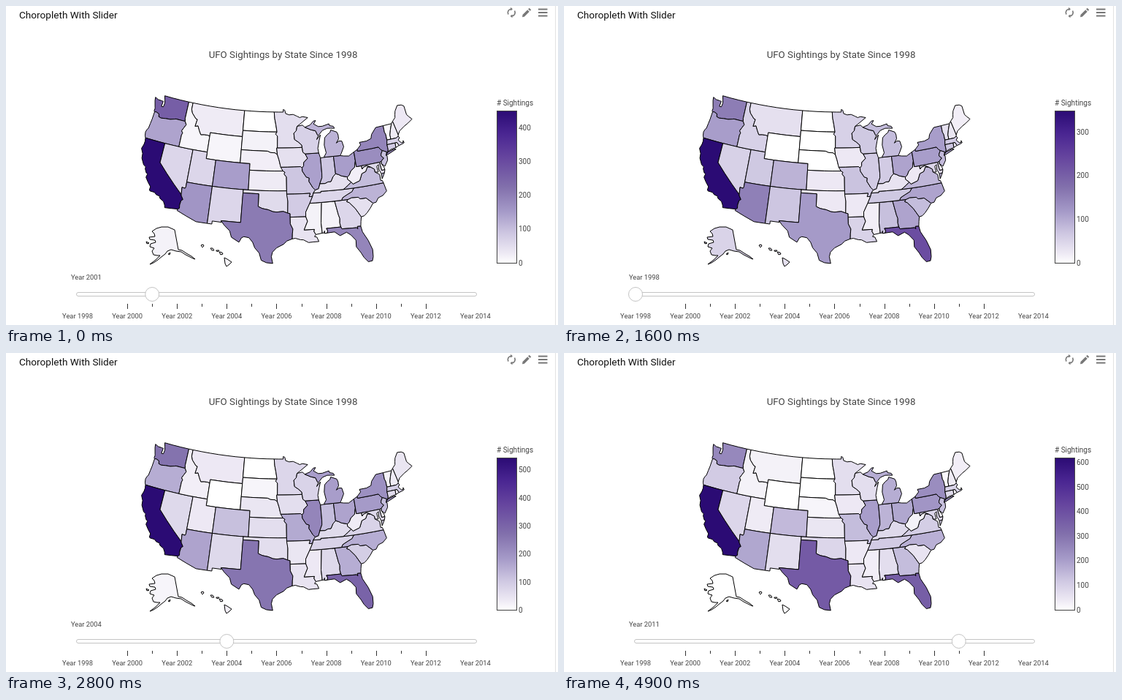
Write an HTML page that moves like this. It is 756 by 436 pixels and loops after 5000 ms.

```html
<!DOCTYPE html>
<html lang="en">
<head>
<meta charset="utf-8">
<title>Choropleth With Slider</title>
<style>
html, body { margin: 0; width: 100%; height: 100%; overflow: hidden; background: #fff; }
svg { display: block; width: 756px; height: 436px; font-family: Roboto, sans-serif; fill: #444; }
#map path { stroke: #000; stroke-width: 1; stroke-linejoin: round; }
.small { font-size: 9.35px; }
.legend { font-size: 10px; }
.icon { fill: none; stroke: #777; stroke-width: 1.6; }
.rail { fill: #fff; stroke: #c4c4c4; }
</style>
</head>
<body>
<svg viewBox="0 0 756 436">
  <defs><linearGradient id="ramp" x1="0" y1="1" x2="0" y2="0"></linearGradient></defs>
  <path d="M752.5 0V436" stroke="#e2e2e2"/>
  <text x="18" y="16.5" font-size="13.6" fill="#111">Choropleth With Slider</text>
  <g class="icon">
    <path d="M688 11.5A4.8 4.8 0 0 1 692 4.2M696.500 6.500A4.800 4.800 0 0 1 692.500 13.800"/>
    <path d="M691 1.800L694 4.200 691 6.600zM693.500 11.400L690.500 13.800 693.500 16.200z" fill="#777" stroke="none"/>
    <path d="M708.5 13.500L715.500 6.500" stroke-width="3.600"/>
    <path d="M716.400 5.600L718 4" stroke-width="3.600"/>
    <path d="M707 15.200l.6-3 2.400 2.400z" fill="#777" stroke="none"/>
    <path d="M729 4.500h12.500M729 9h12.500M729 13.500h12.500" stroke-width="1.800"/>
  </g>
  <text x="379.5" y="71" font-size="13.3" text-anchor="middle">UFO Sightings by State Since 1998</text>
  <g id="map"></g>
  <text class="legend" x="672" y="135.500">#&#160;Sightings</text>
  <rect x="672.500" y="143.500" width="27" height="208" fill="url(#ramp)" stroke="#444"/>
  <g id="scale" class="legend"></g>
  <text id="label" class="small" x="89" y="374"></text>
  <rect class="rail" x="96.500" y="391.500" width="548" height="5" rx="2.500"/>
  <g id="ticks" class="small" text-anchor="middle"></g>
  <circle id="knob" class="rail" cy="394" r="9.500"/>
</svg>
<script>
const LOOP = 5000;
const SCHEDULE = [[0, 2001], [500, 2000], [800, 1999], [1100, 1998], [1900, 1999], [2300, 2000], [2500, 2002],
  [2800, 2004], [3100, 2005], [3500, 2006], [3800, 2007], [4100, 2009], [4500, 2010], [4800, 2011]];
const KEY_YEARS = [1999, 2001, 2004, 2006, 2009, 2011];
const MAXIMA = [347, 447, 541, 106, 526, 615];
const STOPS = [[0, [255, 255, 255]], [.06, [239, 235, 245]], [.2, [205, 198, 225]], [.34, [165, 154, 200]],
  [.5, [130, 112, 172]], [.7, [101, 68, 158]], [.85, [74, 38, 146]], [1, [43, 11, 116]]];

// Percent of the scale in each key year, then the outline as west longitude and latitude.
const STATES = {
  WA: ['45 58 49 70 58 41', '117.03 49 117.04 46.4 116.9 45.98 118.98 46 119.3 45.93 120.2 45.73 121.2 45.67 122.2 45.55 122.77 45.65 122.9 46.08 123.3 46.15 123.55 46.26 123.95 46.18 124.1 46.3 124.07 46.74 124.18 46.93 124.6 47.87 124.7 48.38 123.98 48.16 123.1 48.13 122.75 48.1 122.85 47.3 122.4 47.3 122.3 47.9 122.5 48.4 122.76 49'],
  OR: ['33 31 28 44 22 18', '124.2 42 117.03 42 117.03 43.83 116.9 44.15 117.2 44.45 116.85 45 116.5 45.5 116.9 45.98 118.98 46 119.3 45.93 120.2 45.73 121.2 45.67 122.2 45.55 122.77 45.65 122.9 46.08 123.3 46.15 123.55 46.26 123.95 46.18 124 45 124.1 44.3 124.2 43.5 124.4 43.3 124.55 42.84 124.4 42.3'],
  CA: ['100 100 100 100 100 100', '124.2 42 120 42 120 39 114.63 35 114.57 34.83 114.14 34.3 114.43 34.1 114.55 33.4 114.47 32.9 114.72 32.72 117.13 32.53 117.25 32.9 117.6 33.4 118.4 33.75 118.5 34.03 119.2 34.15 119.6 34.42 120.5 34.45 120.65 34.6 120.62 35.1 121.3 35.68 121.9 36.3 121.8 36.85 122.1 36.96 122.5 37.5 122.5 37.8 123 38 123.7 38.9 123.83 39.6 124.35 40.3 124.1 41 124.07 41.5'],
  NV: ['16 14 13 33 10 14', '120 42 114.04 42 114.04 36.2 114.15 36.02 114.75 36.1 114.63 35 120 39'],
  ID: ['16 3 5 3 9 4', '117.03 49 116.05 49 116.05 48 115.7 47.45 114.7 46.7 114.35 46.65 114.55 45.55 113.95 45.7 113.45 45 113 44.45 112.3 44.55 111.5 44.55 111.05 44.48 111.05 42 117.03 42 117.03 43.83 116.9 44.15 117.2 44.45 116.85 45 116.5 45.5 116.9 45.98 117.04 46.4'],
  MT: ['10 6 7 9 4 4', '116.05 49 104.05 49 104.05 45 111.05 45 111.05 44.48 111.5 44.55 112.3 44.55 113 44.45 113.45 45 113.95 45.7 114.55 45.55 114.35 46.65 114.7 46.7 115.7 47.45 116.05 48'],
  WY: ['0 3 0 4 3 0', '111.05 45 104.05 45 104.05 41 111.05 41'],
  UT: ['19 14 7 14 8 6', '114.04 42 111.05 42 111.05 41 109.05 41 109.05 37 114.04 37'],
  CO: ['26 33 22 25 17 24', '109.05 41 102.05 41 102.04 37 109.05 37'],
  AZ: ['44 36 31 43 27 30', '114.04 37 109.05 37 109.05 31.33 111.07 31.33 114.82 32.5 114.72 32.72 114.47 32.9 114.55 33.4 114.43 34.1 114.14 34.3 114.57 34.83 114.63 35 114.75 36.1 114.15 36.02 114.04 36.2'],
  NM: ['20 14 13 13 7 11', '109.05 37 103 37 103.06 32 106.62 32 106.5 31.77 108.2 31.78 108.2 31.33 109.05 31.33'],
  ND: ['0 0 0 0 0 0', '104.05 49 97.23 49 97.1 48 96.8 47 96.56 45.94 104.05 45.94'],
  SD: ['0 4 3 0 3 0', '104.05 45.94 96.56 45.94 96.85 45.6 96.45 45.3 96.45 43.5 96.6 43.5 96.45 42.5 97 42.76 97.9 42.8 98.5 43 104.05 43'],
  NE: ['0 5 8 8 10 3', '104.05 43 98.5 43 97.9 42.8 97 42.76 96.45 42.5 96.1 41.7 95.85 40.9 95.3 40 102.05 40 102.05 41 104.05 41'],
  KS: ['7 6 11 8 11 8', '102.05 40 95.3 40 94.9 39.8 95.1 39.55 94.62 39.1 94.62 37 102.04 37'],
  OK: ['7 12 11 5 10 14', '103 37 94.62 37 94.43 35.4 94.48 33.64 95.3 33.9 96.5 33.8 97.2 33.85 98.1 34.13 99.2 34.3 100 34.57 100 36.5 103 36.5'],
  TX: ['34 46 48 41 54 60', '103.04 36.5 100 36.5 100 34.57 99.2 34.3 98.1 34.13 97.2 33.85 96.5 33.8 95.3 33.9 94.48 33.64 94.04 33.55 94.04 31.99 93.6 31.2 93.7 30.5 93.75 29.7 94.7 29.4 95.3 28.9 96.5 28.35 97.2 27.7 97.4 27 97.15 25.95 98.2 26.05 99.1 26.4 99.5 27.5 100.3 28.28 100.7 29.1 101.4 29.77 102.3 29.88 102.7 29.7 103.1 28.98 104.5 29.65 104.9 30.6 106 31.4 106.62 32 103.06 32'],
  MN: ['16 11 14 9 17 11', '97.23 49 95.15 49 95.15 49.38 94.8 49.3 94.6 48.75 93.8 48.55 92.9 48.6 92 48.3 91.4 48.07 90.8 48.2 89.6 48 91.4 47.1 92.1 46.75 92.3 46.1 92.87 45.7 92.75 44.75 91.9 44.3 91.25 43.85 91.22 43.5 96.45 43.5 96.45 45.3 96.85 45.6 96.56 45.94 96.8 47 97.1 48'],
  IA: ['7 10 11 11 11 7', '96.45 43.5 91.22 43.5 91.1 42.75 90.64 42.5 90.2 41.8 91.05 41.2 91.1 40.7 91.42 40.4 91.73 40.6 95.77 40.58 95.85 40.9 96.1 41.7 96.45 42.5 96.6 43.5'],
  MO: ['21 20 29 37 28 23', '95.77 40.58 91.73 40.6 91.42 40.4 91.4 39.9 90.7 39 90.1 38.8 90.2 38.3 89.5 37.3 89.1 36.95 89.5 36.5 89.7 36 90.35 36 90.1 36.5 94.62 36.5 94.62 39.1 95.1 39.55 94.9 39.8 95.3 40'],
  AR: ['7 18 8 0 10 7', '94.62 36.5 90.1 36.5 90.35 36 89.7 36 90.3 35 91.15 33.7 91.17 33 94.04 33.02 94.04 33.55 94.48 33.64 94.43 35.4'],
  LA: ['15 9 9 9 8 9', '94.04 33.02 91.17 33 90.9 32.3 91.6 31 89.73 31 89.85 30.7 89.55 30.2 89.8 29.9 89.4 29.8 89.1 29.1 90.1 29.1 90.9 29.05 91.8 29.5 92.3 29.53 93.2 29.78 93.75 29.7 93.7 30.5 93.6 31.2 94.04 31.99'],
  MS: ['5 4 7 3 5 5', '90.3 35 88.2 35 88.1 34.9 88.47 31.9 88.4 30.35 89.55 30.2 89.85 30.7 89.73 31 91.6 31 90.9 32.3 91.17 33 91.15 33.7'],
  AL: ['22 4 13 7 9 11', '88.2 35 85.6 34.98 85.18 32.86 85 32.3 85.1 31.6 85 31 87.6 31 87.4 30.65 87.5 30.3 88 30.25 87.95 30.65 88.1 30.35 88.4 30.35 88.47 31.9 88.1 34.9'],
  GA: ['31 14 28 11 16 23', '85.6 34.98 83.1 35 83.35 34.7 82.9 34.5 81.95 33.5 81.4 32.6 81.1 32.1 81.3 31.4 81.45 30.7 82.05 30.75 82.05 30.36 82.2 30.57 84.86 30.7 85 31 85.1 31.6 85 32.3 85.18 32.86'],
  FL: ['66 42 56 39 46 58', '87.6 31 85 31 84.86 30.7 82.2 30.57 82.05 30.36 82.05 30.75 81.45 30.7 81.3 29.8 80.55 28.4 80.05 26.9 80.15 25.8 80.4 25.2 81.1 25.15 81.7 25.9 82.1 26.7 82.75 27.7 82.65 28.7 83.4 29.6 84.1 30.1 85.3 29.7 86.2 30.35 87.5 30.3 87.4 30.65'],
  SC: ['23 10 17 11 14 9', '83.1 35 82.3 35.2 81.05 35.1 80.8 34.82 79.67 34.8 78.55 33.85 79.2 33.2 79.9 32.6 80.5 32.2 81.1 32.1 81.4 32.6 81.95 33.5 82.9 34.5 83.35 34.7'],
  NC: ['31 26 28 8 28 27', '84.3 35 83.1 35 82.3 35.2 81.05 35.1 80.8 34.82 79.67 34.8 78.55 33.85 77.95 33.9 77.4 34.5 76.5 34.7 75.6 35.25 75.87 36.55 81.68 36.58 82.1 36.1 83.1 35.75 84 35.4'],
  TN: ['19 14 15 18 17 18', '90.3 35 89.7 36 89.5 36.5 88.07 36.5 88.05 36.68 83.68 36.6 81.68 36.58 82.1 36.1 83.1 35.75 84 35.4 84.3 35 88.2 35'],
  KY: ['9 10 12 9 13 13', '89.5 36.5 89.1 36.95 88.45 37.1 88.1 37.85 87.1 37.8 86.5 38 85.9 38 85.4 38.7 84.82 39.1 84.3 38.95 83.7 38.65 82.6 38.4 82.6 38 81.97 37.54 82.7 37.1 83.68 36.6 88.05 36.68 88.07 36.5'],
  VA: ['25 23 15 14 22 17', '83.68 36.6 75.87 36.55 76 36.95 76.3 37 76.25 37.9 77.05 38.4 77.05 38.85 77.75 39.3 78.35 39.4 78.85 38.75 79.65 38.55 80.3 37.55 81.7 37.2 81.97 37.54 82.7 37.1/75.95 37.2 75.9 37.95 75.25 38.03 75.6 37.6'],
  WV: ['7 5 6 7 3 4', '82.6 38.4 82.6 38 81.97 37.54 81.7 37.2 80.3 37.55 79.65 38.55 78.85 38.75 78.35 39.4 77.75 39.3 78.4 39.6 79.1 39.48 79.48 39.2 79.48 39.72 80.52 39.72 80.52 40.63 80.65 40.4 80.87 39.7 81.75 39.2 82.2 38.6'],
  IL: ['18 32 42 39 42 33', '90.64 42.5 87.8 42.5 87.53 41.7 87.53 39.35 87.6 38.7 88.1 37.85 88.45 37.1 89.1 36.95 89.5 37.3 90.2 38.3 90.1 38.8 90.7 39 91.4 39.9 91.42 40.4 91.1 40.7 91.05 41.2 90.2 41.8'],
  IN: ['18 20 23 9 21 26', '87.53 41.7 86.82 41.76 84.82 41.76 84.82 39.1 85.4 38.7 85.9 38 86.5 38 87.1 37.8 88.1 37.85 87.6 38.7 87.53 39.35'],
  OH: ['31 33 31 31 30 30', '84.82 41.76 83.45 41.73 82.7 41.6 81.7 41.5 80.52 41.98 80.52 40.63 80.65 40.4 80.87 39.7 81.75 39.2 82.2 38.6 82.6 38.4 83.7 38.65 84.3 38.95 84.82 39.1'],
  WI: ['19 16 15 24 15 11', '92.1 46.75 90.9 46.9 90.4 46.55 89.1 46.1 88.1 45.9 87.8 45.35 87.6 45.1 88 44.55 87.1 45.2 87.5 44.3 87.9 43.2 87.8 42.5 90.64 42.5 91.1 42.75 91.22 43.5 91.25 43.85 91.9 44.3 92.75 44.75 92.87 45.7 92.3 46.1'],
  MI: ['23 26 33 32 27 28', '90.4 46.55 89.2 46.85 88.4 47.4 87.9 47.45 88.4 46.95 87.4 46.5 86.5 46.5 85 46.75 84.9 46.45 84.1 46.3 83.9 45.97 84.7 46.05 85.5 46.1 86.6 45.85 87.6 45.1 87.8 45.35 88.1 45.9 89.1 46.1/84.82 41.76 86.82 41.76 86.25 42.4 86.5 43.6 86.25 44.7 85.6 45.15 85 45.4 84.75 45.78 83.5 45.35 83.3 44.9 83.3 44.3 83.9 43.7 83.3 43.95 82.7 43.9 82.45 43 83.15 42.05 83.45 41.73'],
  PA: ['33 39 34 32 34 36', '80.52 41.98 79.76 42.27 79.76 42 75.35 42 75.05 41.6 74.7 41.35 75.1 40.9 75.2 40.6 74.75 40.2 75.4 39.8 75.8 39.72 80.52 39.72'],
  NY: ['33 42 38 33 37 39', '79.76 42 79.76 42.27 78.9 42.85 79.05 43.27 77.5 43.27 76.5 43.5 76.2 44.1 75 45 73.35 45 73.4 44 73.25 43.6 73.27 42.75 73.5 42.05 73.5 41.3 73.65 41 73.95 40.75 73.6 40.95 72.3 41.15 71.9 41.07 73.9 40.55 74.1 40.6 73.9 41 74.7 41.35 75.05 41.6 75.35 42'],
  VT: ['10 2 4 2 3 2', '73.35 45 71.5 45 72.05 44.1 72.4 43.4 72.45 42.73 73.27 42.75 73.25 43.6 73.4 44'],
  NH: ['8 6 6 2 6 6', '71.5 45 71.1 45.3 70.7 43.1 70.8 42.87 71.3 42.7 72.45 42.73 72.4 43.4 72.05 44.1'],
  ME: ['5 7 8 7 6 5', '71.1 45.3 70.4 45.75 70.25 46.2 70 46.7 69.2 47.45 68.3 47.35 67.8 47.07 67.8 45.7 67.45 45.3 66.95 44.8 68 44.4 69 44.1 70.2 43.6 70.7 43.1'],
  MA: ['18 16 17 11 18 15', '73.27 42.75 71.3 42.7 70.8 42.87 70.6 42.65 71 42.3 70.5 41.8 70.1 41.8 70.05 42.05 69.95 41.7 70.6 41.55 71.15 41.5 71.38 42.02 71.8 42.02 73.5 42.05'],
  RI: ['8 4 5 2 5 4', '71.8 42.02 71.38 42.02 71.15 41.5 71.85 41.32'],
  CT: ['20 18 12 10 14 12', '73.5 42.05 71.8 42.02 71.85 41.32 73 41.2 73.65 41 73.5 41.3'],
  NJ: ['24 22 23 16 23 22', '74.7 41.35 73.9 41 74.2 40.5 74 40.4 74.1 39.75 74.9 38.95 75.5 39.5 75.4 39.8 74.75 40.2 75.2 40.6 75.1 40.9'],
  DE: ['5 4 4 2 4 4', '75.8 39.72 75.4 39.8 75.5 39.5 75.1 38.8 75.05 38.45 75.7 38.46'],
  MD: ['14 13 13 10 13 14', '79.48 39.72 75.8 39.72 75.7 38.46 75.05 38.45 75.25 38.03 75.9 37.95 76.2 38.7 76.1 39.4 76.5 39.2 76.4 38.3 77.05 38.4 77.05 38.85 77.75 39.3 78.4 39.6 79.1 39.48 79.48 39.2']
};

// The two inset states are drawn straight in stage pixels.
const INSETS = {
  AK: ['15 4 3 11 0 0', 'M213 302L222 302 231 306 236 333 241 334 247 338 254 342 259 346 256 345 246 340 240 336 233 335 226 333 221 335 218 339 214 342 208 347 202 351 197 353 205 347 211 341 207 341 202 340 200 335 203 331 197 329 198 325 205 323 204 320 197 319 196 316 204 315 203 311 200 308 206 304zM192 322l4 2-3 1zM222 339l3-2-1 3z'],
  HI: ['10 3 5 8 1 1', 'M267 327l3-1 1 2-2 2zM280 331l3 0 2 3-3 0zM288 334l4 0-1 1.500-3-.5zM292 336l4 1 1 2-3 1zM299 344l4 2 6 4-3 3-4 3-2-4z']
};

const $ = id => document.getElementById(id);
const mix = (a, b, t) => a + (b - a) * t;

function add(parent, tag, attrs, text = '') {
  const node = document.createElementNS('http://www.w3.org/2000/svg', tag);
  for (const key in attrs) node.setAttribute(key, attrs[key]);
  node.textContent = text;
  return parent.appendChild(node);
}

// Albers equal-area conic, parallels 29.5 and 45.5, centred on 96 W.
const rad = Math.PI / 180;
const s1 = Math.sin(29.5 * rad);
const cone = (s1 + Math.sin(45.5 * rad)) / 2;
const radius = lat => Math.sqrt(1 - s1 * s1 + 2 * cone * (s1 - Math.sin(lat * rad))) / cone;
function project(west, lat) {
  const r = radius(lat) * 513, angle = cone * (96 - west) * rad;
  return [374.6 + r * Math.sin(angle), 237.4 - radius(38.7) * 513 + r * Math.cos(angle)]
    .map(v => v.toFixed(1)).join(' ');
}

function ringPath(ring) {
  const n = ring.split(' ').map(Number), points = [];
  for (let i = 0; i < n.length; i += 2) {
    const j = (i + 2) % n.length;
    const parts = Math.max(1, Math.ceil(Math.abs(n[j] - n[i]) / 2));
    for (let k = 0; k < parts; k++)
      points.push(project(mix(n[i], n[j], k / parts), mix(n[i + 1], n[j + 1], k / parts)));
  }
  return 'M' + points.join('L') + 'z';
}

function color(t) {
  const i = Math.max(1, STOPS.findIndex(stop => stop[0] >= t));
  const [t0, a] = STOPS[i - 1], [t1, b] = STOPS[i];
  return `rgb(${a.map((v, c) => Math.round(mix(v, b[c], (t - t0) / (t1 - t0))))})`;
}

// 2006 is an outlier, so it does not influence the years around it.
function valueAt(year, values) {
  const exact = KEY_YEARS.indexOf(year);
  if (exact >= 0) return values[exact];
  if (year < KEY_YEARS[0]) return values[0];
  const known = KEY_YEARS.map((y, i) => [y, values[i]]).filter(([y]) => y !== 2006);
  const i = known.findIndex(([y]) => y > year);
  const [y0, v0] = known[i - 1], [y1, v1] = known[i];
  return mix(v0, v1, (year - y0) / (y1 - y0));
}

const sliderX = year => 98 + (year - 1998) * 34.06;

const shapes = [
  ...Object.values(STATES).map(([levels, rings]) => [levels, rings.split('/').map(ringPath).join('')]),
  ...Object.values(INSETS)
].map(([levels, d]) => ({ levels: levels.split(' ').map(Number), node: add($('map'), 'path', { d }) }));

for (const [offset, rgb] of STOPS) add($('ramp'), 'stop', { offset, 'stop-color': `rgb(${rgb})` });

for (let year = 1998; year <= 2014; year++) {
  const x = sliderX(year), major = year % 2 === 0;
  if (year > 1999 && year < 2013)
    add($('ticks'), 'path', { d: `M${Math.round(x) + .5} 407v${major ? 7 : 4}`, stroke: '#333' });
  if (major) add($('ticks'), 'text', { x, y: 427 }, 'Year ' + year);
}

function show(year) {
  for (const { levels, node } of shapes) node.setAttribute('fill', color(valueAt(year, levels) / 100));
  const max = valueAt(year, MAXIMA), step = max < 150 ? 20 : 100;
  $('scale').textContent = '';
  for (let v = 0; v <= max; v += step)
    add($('scale'), 'text', { x: 702, y: 354.8 - v / max * 207 }, v);
  $('label').textContent = 'Year ' + year;
  $('knob').setAttribute('cx', sliderX(year));
}

let shown;
function frame() {
  const time = performance.now() % LOOP;
  const year = SCHEDULE.filter(([start]) => start <= time).pop()[1];
  if (year !== shown) show(shown = year);
  requestAnimationFrame(frame);
}
frame();
</script>
</body>
</html>
```
